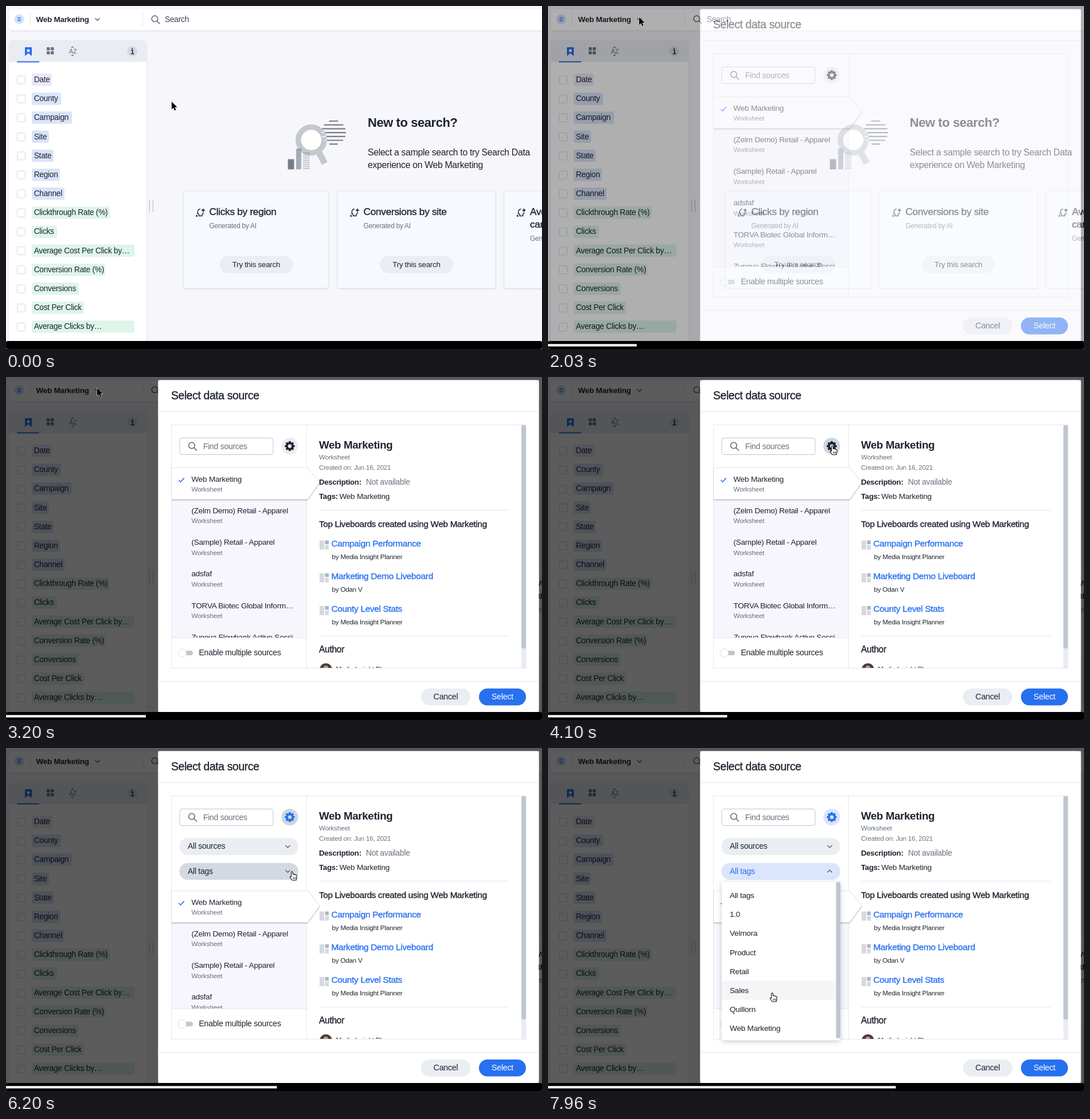
Write an HTML page that moves like this. It is 935 by 599 pixels and loops after 8 s.

```html
<!DOCTYPE html>
<html lang="en">
<head>
<meta charset="utf-8">
<title>Select data source</title>
<style>
html, body { margin: 0; height: 100%; overflow: hidden; background: #f6f6fb; }
svg { display: block; width: 935px; height: 599px; font-family: "Liberation Sans", Arial, sans-serif; }
text { letter-spacing: -.02em; white-space: pre; }
.card { filter: drop-shadow(0 1px 1.5px rgba(40, 60, 100, .14)); }
.row { filter: drop-shadow(0 1px 1.2px rgba(40, 50, 70, .42)); }
.menu { filter: drop-shadow(0 2px 4px rgba(30, 40, 60, .25)); }
</style>
</head>
<body>
<svg id="stage" viewBox="0 0 935 599"></svg>
<script>
const INK = '#1d232f', GREY = '#69717e', BLUE = '#2770ef', LINE = '#e4e7ee', PILL = '#eaedf2';
const DURATION = 8000, LIST_SHIFT = 91, TAG_TOP = 240.5, TAG_STEP = 33.2;
const CLICK_SOURCE = 1945, DETAILS = 2040, LOADED = 2700, CLICK_GEAR = 4500, CLICK_TAGS = 6500;

// Markup helpers; weight 'medium' thickens the regular face slightly.
const text = (x, y, size, str, weight = '', fill = INK, extra = '') => {
  const style = weight === 'bold' ? 'font-weight="700"'
    : weight === 'medium' ? `stroke="${fill}" stroke-width=".35"` : '';
  return `<text x="${x}" y="${y}" font-size="${size}" fill="${fill}" ${style} ${extra}>${str}</text>`;
};
const rect = (x, y, w, h, fill, r = 0, extra = '') =>
  `<rect x="${x}" y="${y}" width="${w}" height="${h}" rx="${r}" fill="${fill}" ${extra}/>`;
const circle = (x, y, r, fill, extra = '') => `<circle cx="${x}" cy="${y}" r="${r}" fill="${fill}" ${extra}/>`;
const path = (d, stroke, width = 1, fill = 'none', extra = '') =>
  `<path d="${d}" stroke="${stroke}" stroke-width="${width}" fill="${fill}" ${extra}/>`;
const group = (id, body, extra = '') => `<g id="${id}" ${extra}>${body}</g>`;
const lens = (x, y) => path(`M${x + 4} ${y + 4}l5 5M${x + 5.3} ${y}a5.3 5.3 0 1 1-10.6 0a5.3 5.3 0 1 1 10.6 0`, '#5b6270', 1.5);
const chevron = (x, y, dir = 1) => path(`M${x - 4} ${y - 2 * dir}l4 ${4 * dir} 4 ${-4 * dir}`, '#5b6270', 1.5);
const repeat = (n, fn) => Array.from({ length: n }, (_, i) => fn(i)).join('');

function header() {
  return rect(5, 6, 940, 36.5, '#fff', 5, 'class="card"')
    + circle(23, 23, 8.5, '#d3e2ff') + path('M20 20.3h6M20 23h6M20 25.7h6', BLUE, 1.2)
    + path('M42.5 11v24M238.5 11v24', LINE)
    + text(52.5, 28, 13.5, 'Web Marketing', 'bold') + chevron(159.5, 23.3)
    + lens(259.5, 22.3) + text(277, 28, 13.8, 'Search', '', '#3b424f');
}

function sidebar() {
  const fields = [
    ['Date', 35, '#eae8fa'], ['County', 51], ['Campaign', 70], ['Site', 30], ['State', 38],
    ['Region', 49], ['Channel', 57], ['Clickthrough Rate (%)', 136], ['Clicks', 44],
    ['Average Cost Per Click by…', 179], ['Conversion Rate (%)', 128], ['Conversions', 82],
    ['Cost Per Click', 91], ['Average Clicks by…', 179]];
  const rows = fields.map(([name, width, colour], i) => {
    const y = 128.5 + i * 33.18;
    return rect(19.5, y - 6.5, 14, 14, '#fff', 2, 'stroke="#d3d8e0"')
      + rect(45, y - 10.5, width, 21.5, colour || (i < 7 ? '#dae4fa' : '#dff5ea'), 3)
      + text(48.7, y + 4.5, 13.75, name);
  }).join('');
  const tiles = repeat(4, i => rect(71 + i % 2 * 7, 72 + (i >> 1) * 7, 5.5, 5.5, GREY, 1));
  return rect(5, 60, 240, 530, '#fff', 5, 'class="card"')
    + path('M5 97.5V65a5 5 0 0 1 5-5H240a5 5 0 0 1 5 5V97.5z', 'none', 0, '#e9ecf3')
    + rect(19, 96.5, 39, 2, BLUE)
    + path('M33.5 72.5h11v14l-5.5-4.5-5.5 4.5z', BLUE, 1, BLUE, 'stroke-linejoin="round"')
    + path('M39 74.5l1.1 2.1 2.3.4-1.7 1.6.4 2.3-2.1-1.1-2.1 1.1.4-2.3-1.7-1.6 2.3-.4z', 'none', 0, '#fff')
    + tiles + text(109.8, 83, 11, 'AZ', '', GREY) + path('M114 73l2-2 2 2M114 85l2 2 2-2', GREY, 1.2)
    + circle(220.3, 79.3, 8.8, '#d3d8e1')
    + path('M218.3 77.3h2.5v6M217.8 83.5h5.4', INK, 1.6) + circle(220.3, 74.7, 1.1, INK)
    + rows + path('M250.5 338v22M256.5 338v22', '#bfc5cf', 1.3);
}

function illustration() {
  const stripes = repeat(7, i => {
    const dy = -20 + i * 6.7, half = Math.sqrt(21.5 ** 2 - dy ** 2);
    return `M${571.5 - half} ${221 + dy}h${2 * half}`;
  });
  const hatch = repeat(15, i => `M506 ${250 + i * 3}l9.5 -7`);
  const dots = repeat(36, i => rect(519 + i % 4 * 2.9, 256 + (i >> 2) * 3.4, 1.4, 1.4, GREY));
  return path('M545 254l11 21', '#c3c8cf', 11) + circle(532.5, 234, 22.5, '#fff', 'stroke="#c3c8cf" stroke-width="9.5"')
    + path(stripes, '#777e87', 2.2)
    + '<clipPath id="ringClip"><circle cx="532.5" cy="234" r="27.2"/></clipPath>'
    + path(stripes, '#eceef1', 2.4, 'none', 'clip-path="url(#ringClip)"')
    + rect(491.7, 267.5, 10.8, 17.8, '#777e87')
    + '<clipPath id="barClip"><rect x="506" y="249" width="9.5" height="36.3"/></clipPath>'
    + path(hatch, '#777e87', 1.5, 'none', 'clip-path="url(#barClip)"') + dots;
}

function card(x, width, lines, buttonX) {
  const bulb = path('M6.5-5A5.2 5.2 0 0 0 4 4.4V7H9.5V4.4A5.2 5.2 0 0 0 12 1', INK, 1.4)
    + path('M11.5-6.5l1.1 2.6 2.6 1.1-2.6 1.1-1.1 2.6-1.1-2.6-2.6-1.1 2.6-1.1z', 'none', 0, INK)
    + circle(.2, 7, 1.5, INK) + circle(1.2, 3.6, .8, INK);
  return rect(x, 323.5, width, 169, '#f6f9fe', 3, 'stroke="#e4ebf3" class="card"')
    + `<g transform="translate(${x + 23} 359.5)">${bulb}</g>`
    + lines.map((line, i) => text(x + 45, 365 + i * 22, 17.4, line, 'medium')).join('')
    + text(x + 45, 366 + lines.length * 22, 11.9, 'Generated by AI', '', GREY)
    + (buttonX ? rect(buttonX, 436.5, 128, 30, PILL, 15)
      + text(buttonX + 64, 455.5, 13.4, 'Try this search', '', INK, 'text-anchor="middle"') : '');
}

function welcome() {
  return illustration() + text(631, 211, 22, 'New to search?', 'bold')
    + text(631, 261, 15.8, 'Select a sample search to try Search Data')
    + text(631, 283, 15.8, 'experience on Web Marketing')
    + card(309.5, 253, ['Clicks by region'], 372.5)
    + card(578.5, 275, ['Conversions by site'], 652)
    + card(869, 275, ['Average cost', 'campaign']);
}

function sourceList() {
  const names = ['Web Marketing', '(Zelm Demo) Retail - Apparel', '(Sample) Retail - Apparel',
    'adsfaf', 'TORVA Biotec Global Inform…', 'Zunova Flowbank Active Sessi…'];
  return rect(289, 158, 235, 400, '#f6f6fc')
    + path('M289 158.5H526L547 184.5L526 213.5H289z', LINE, .6, '#fff', 'class="row"')
    + path('M301.5 180l3.2 3.2 6-6.8', BLUE, 1.6)
    + names.map((name, i) => text(323.5, 182.5 + i * 55.25, 13.6, name)
      + text(323.5, 200 + i * 55.25, 11.75, 'Worksheet', '', GREY)).join('');
}

function gear() {
  const teeth = repeat(8, i => `<rect x="-2" y="-8.6" width="4" height="5" rx="1" transform="rotate(${i * 45})"/>`);
  return circle(495, 120.7, 14.7, PILL, 'id="gearDisc"')
    + `<g id="gear" transform="translate(495 120.7)" fill="${INK}">${teeth}`
    + `<circle r="4.9" fill="none" stroke="${INK}" stroke-width="3.4" id="gearRing"/></g>`;
}

function details() {
  const author = 'Media Insight Planner';
  const boards = [['Campaign Performance', author], ['Marketing Demo Liveboard', 'Odan V'], ['County Level Stats', author]];
  const links = boards.map(([name, owner], i) => {
    const y = 296 + i * 57.2;
    return rect(547, y - 10.5, 8, 16, '#d5d9e1') + rect(556.5, y - 10.5, 6.5, 6.5, '#aeb5c1') + rect(556.5, y - 2.5, 6.5, 8, '#d5d9e1')
      + text(567.5, y, 15.4, name, 'medium', BLUE) + text(568.5, y + 22, 11.7, 'by ' + owner);
  }).join('');
  return text(546, 124.5, 18.8, 'Web Marketing', 'bold') + text(546, 144, 11.75, 'Worksheet', '', GREY)
    + text(546, 161.5, 11.6, 'Created on: Jun 16, 2021', '', GREY)
    + text(546, 187.5, 13.2, 'Description:', 'bold') + text(628, 187.5, 13.9, 'Not available', '', GREY)
    + text(546, 213, 13.2, 'Tags:', 'bold') + text(581.5, 213, 13.6, 'Web Marketing')
    + text(546, 262, 15.25, 'Top Liveboards created using Web Marketing', 'medium')
    + group('loading', path('M546 232.5H884M546 372.5H884', LINE)
      + repeat(3, i => circle(693.3 + i * 18.5, 312.5, 5.8, '#bac1cc'))
      + text(546, 402, 15.6, 'Author', 'medium') + text(575.5, 435, 11.7, author))
    + group('loaded', path('M546 232.5H877M546 452.5H877', LINE) + links
      + text(546, 481, 15.6, 'Author', 'medium')
      + `<g clip-path="url(#panelClip)">${circle(558, 511, 11, '#4b3f3b')}${circle(558, 508, 4, '#c39a86')}`
      + text(575.5, 514, 11.7, author) + '</g>'
      + rect(899, 84, 8, 424, '#e9ecf2') + rect(899, 84, 8, 390, '#c0c6d1', 3));
}

function modal() {
  const select = (y, label, id) => rect(302.5, y - 14.5, 207.5, 29.5, PILL, 14.7, `id="${id}"`)
    + text(317, y + 4.2, 14, label, '', INK, `id="${id}Text"`);
  const tags = ['All tags', '1.0', 'Velmora', 'Product', 'Retail', 'Sales', 'Quillorn', 'Web Marketing'];
  const menu = rect(303, 234, 207, 276.5, '#fff', 2, 'class="menu"')
    + rect(303, 0, 199, 33, '#f4f5f6', 0, 'id="tagHover"')
    + tags.map((tag, i) => text(317, 262 + i * TAG_STEP, 13.7, tag)).join('')
    + rect(502.5, 234, 7.5, 273, '#c0c6d0', 3);
  return '<clipPath id="panelClip"><rect x="288" y="84" width="620" height="424"/></clipPath>'
    + '<clipPath id="listClip"><rect x="288.5" y="150" width="270" height="305.5"/></clipPath>'
    + rect(265.5, 5.5, 664, 579.5, '#fff', 5)
    + text(288, 38.5, 19.4, 'Select data source', 'medium')
    + path('M266 60.5H929M266 531.5H929', LINE)
    + rect(288.5, 83.5, 618.5, 425, 'none', 0, `stroke="${LINE}"`) + path('M524.5 84V508', LINE)
    + rect(303, 106.5, 163, 29, '#fff', 4, 'stroke="#c0c6d0"') + lens(324, 119.5) + text(344, 126, 14, 'Find sources', '', GREY)
    + gear()
    + `<g clip-path="url(#listClip)">${group('list', sourceList())}</g>`
    + path('M289 455.5H524', LINE)
    + rect(305, 478, 21, 8, '#c0c6d0', 4) + circle(307.5, 482, 7.2, '#fff', 'stroke="#d9dde5"')
    + text(336.5, 486.2, 14.1, 'Enable multiple sources')
    + group('details', details())
    + group('filters', select(172, 'All sources', 'sources') + chevron(491.5, 172)
      + select(215.3, 'All tags', 'tags') + group('tagsClosed', chevron(491.5, 215.3)) + group('tagsOpen', chevron(491.5, 215.3, -1)))
    + group('menu', menu)
    + rect(724, 544, 86, 29.5, PILL, 14.75) + text(767, 562.5, 14.3, 'Cancel', '', INK, 'text-anchor="middle"')
    + rect(825, 544, 82, 29.5, BLUE, 14.75) + text(866, 562.5, 14.3, 'Select', '', '#fff', 'text-anchor="middle"');
}

const arrow = path('M0 0V13.4L3.1 10.6L5.2 15.4L7.4 14.4L5.4 9.8H9.6Z', '#fff', 1, '#000', 'paint-order="stroke"');
const hand = path('M-1.4 1.2Q0-.8 1.4 1.2V5.2Q2.8 4.2 3.8 5.6Q5.2 4.8 6 6.2Q8 5.6 8.2 7.6V11L7 15.5H.2L-3.6 10.2Q-4 8.2-1.4 9.4Z',
  '#111', 1.1, '#fff', 'stroke-linejoin="round"') + path('M2 10v3.5M4 10v3.5M6 10v3.5', '#111', .8);

// The dimming surrounds the dialog and leaves its area clear.
const surround = path('M0 0H935V599H0zM265.5 5.5H929.5V585H265.5z', 'none', 0, '#000', 'fill-rule="evenodd" id="backdrop"');

document.getElementById('stage').innerHTML = rect(0, 0, 935, 599, '#f6f6fb')
  + welcome() + sidebar() + header()
  + surround + group('modal', modal())
  + rect(0, 585, 935, 14, '#000', 3) + rect(0, 590.3, 0, 4.2, '#fff', 0, 'id="progress"')
  + group('cursor', group('arrow', arrow) + group('hand', hand));

const el = id => document.getElementById(id);
const set = (id, name, value) => el(id).setAttribute(name, value);
const show = (id, on) => set(id, 'display', on ? 'inline' : 'none');

// Resting points of the pointer: time, x, y.
const stops = [[200, 289, 167], [1220, 159, 19.5], [3400, 159, 19.5], [4150, 500, 121.5],
  [5100, 500, 121.5], [5780, 499, 215.5], [6750, 499, 215.5], [7450, 391, 427.5]];

function pointerAt(t) {
  const i = stops.findIndex(stop => t < stop[0]);
  if (i < 0) return stops.at(-1).slice(1);
  if (i === 0) return stops[0].slice(1);
  const [t0, x0, y0] = stops[i - 1], [t1, x1, y1] = stops[i];
  const p = (t - t0) / (t1 - t0), k = p * p * (3 - 2 * p);
  return [x0 + (x1 - x0) * k, y0 + (y1 - y0) * k];
}

function draw(t) {
  const [x, y] = pointerAt(t);
  const fade = Math.min(1, Math.max(0, (t - CLICK_SOURCE) / 175));
  const filtersOpen = t >= CLICK_GEAR, menuOpen = t >= CLICK_TAGS;
  const over = (x0, y0, x1, y1) => x >= x0 && x <= x1 && y >= y0 && y <= y1;

  set('backdrop', 'opacity', .64 * fade);
  set('modal', 'opacity', fade);
  show('modal', fade > 0);
  show('details', t >= DETAILS);
  show('loading', t < LOADED);
  show('loaded', t >= LOADED);

  set('list', 'transform', `translate(0 ${filtersOpen ? LIST_SHIFT : 0})`);
  show('filters', filtersOpen);
  show('tagsClosed', !menuOpen);
  show('tagsOpen', menuOpen);
  show('menu', menuOpen);

  const gearColour = filtersOpen ? BLUE : INK;
  set('gear', 'fill', gearColour);
  set('gearRing', 'stroke', gearColour);
  set('gearDisc', 'fill', menuOpen ? '#dbe5fb' : filtersOpen || over(480, 106, 510, 135) ? '#d0d6e0' : PILL);
  set('sources', 'fill', over(303, 157, 510, 187) ? '#d3d8e1' : PILL);
  set('tags', 'fill', menuOpen ? '#dbe5fb' : over(303, 201, 510, 230) ? '#d3d8e1' : PILL);
  set('tagsText', 'fill', menuOpen ? BLUE : INK);

  const tag = Math.floor((y - TAG_TOP) / TAG_STEP);
  show('tagHover', tag >= 0);
  set('tagHover', 'y', TAG_TOP + Math.max(0, tag) * TAG_STEP);

  set('progress', 'width', t * .0762);
  set('cursor', 'transform', `translate(${x} ${y})`);
  const pointing = x > 300 && y > 105;
  show('arrow', !pointing);
  show('hand', pointing);
}

const start = performance.now();
(function tick() {
  draw((performance.now() - start) % DURATION);
  requestAnimationFrame(tick);
})();
</script>
</body>
</html>
```
